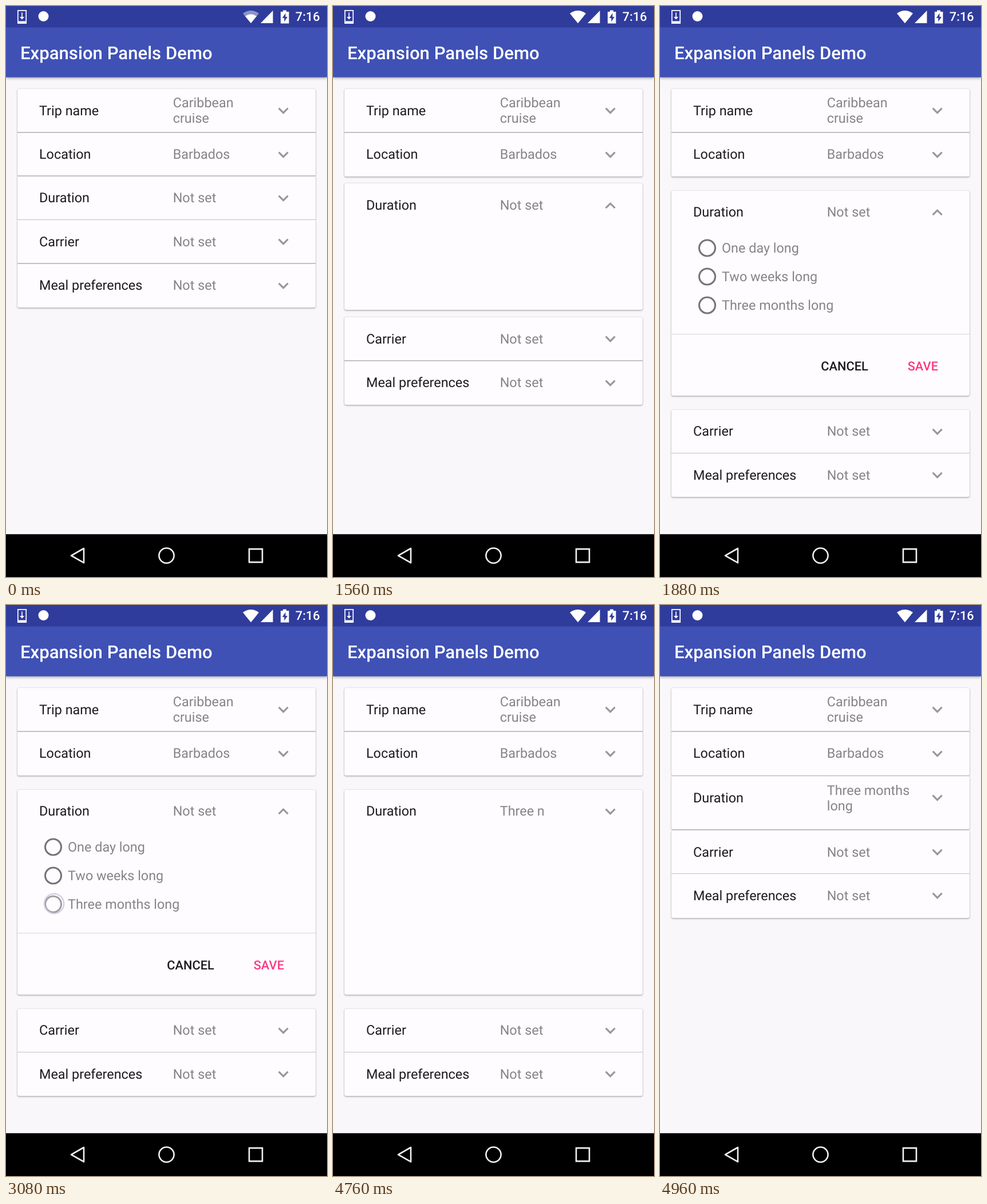
An HTML page for the animation above (5000 ms loop, 561 by 998 pixels).

```html
<!DOCTYPE html>
<html lang="en">
<head>
<meta charset="utf-8">
<title>Expansion Panels Demo</title>
<style>
  html, body { margin: 0; width: 100%; height: 100%; overflow: hidden; }
  body { position: relative; background: #f9f7fa; font: 23.4px/27.4px Roboto, sans-serif; color: #1c1b1e;
    text-rendering: geometricPrecision; }
  body > *, .row > *, .body > * { position: absolute; }
  .bar { filter: drop-shadow(0 2px 2px rgba(0,0,0,.3)); }
  .title { left: 25px; top: 64px; font-size: 31.1px; line-height: 37px; font-weight: 500; color: #fff; white-space: nowrap; }
  .clock { left: 505.8px; top: 7px; font-size: 21.8px; line-height: 26px; font-weight: 500; color: #fff; }
  .card { left: 20px; width: 521px; background: #fefcff; border-radius: 3px;
    box-shadow: 0 1.5px 3px rgba(0,0,0,.28), 0 0 2px rgba(0,0,0,.2); }
  .row { position: relative; height: 76.4px; }
  .row + .row::before, .merged .card + .card .row:first-child::before {
    content: ""; position: absolute; left: 0; top: -1.4px; width: 100%; height: 1.7px; background: #c2c0c4; }
  .merged .card + .card { border-radius: 0 0 3px 3px; }
  .name { left: 38px; top: 24.8px; white-space: nowrap; }
  .hint { left: 271.7px; top: .6px; bottom: 0; margin: auto 0; height: fit-content;
    overflow: hidden; white-space: nowrap; color: #858487; }
  .chevron { left: 450px; top: 23.3px; fill: none; stroke: #98979a; stroke-width: 3.1; }
  .body { position: relative; overflow: hidden; }
  .body > div { inset: 0 0 auto; height: 281.7px; }
  .body span { position: absolute; white-space: nowrap; }
  .label { left: 88px; color: #858487; }
  .button { top: 218px; font-size: 21.8px; font-weight: 500; }
  .touch { box-sizing: border-box; width: 36px; height: 36px; margin: -18px; border-radius: 50%;
    border: 2px solid #cfcbe2; background: rgba(255,255,255,.3); box-shadow: 0 0 2px #dcd8ec; }
  svg { display: block; overflow: visible; }
</style>
</head>
<body>
<svg style="left:0;top:0" width="561" height="998" fill="#fff">
  <rect class="bar" y="30" width="561" height="94.6" fill="#3f51b5"/>
  <rect width="561" height="37.4" fill="#303c9c"/>
  <rect y="923.2" width="561" height="74.8" fill="#000"/>
  <path d="M20.8 7.8H35.2V30H20.8Z" fill="none" stroke="#fff" stroke-width="1.7"/>
  <path d="M20 26.5H36V31H20ZM27.2 11.5H28.8V19H32L28 23.5L24 19H27.2Z"/>
  <circle cx="65.5" cy="18" r="9"/>
  <path id="wifi" d="M414 13Q428 3 442 13L428 30Z"/>
  <path d="M414 13Q428 3 442 13L428 30Z" transform="translate(428 30) scale(.72) translate(-428 -30)"/>
  <path d="M445 30L466.5 30V8Z"/>
  <path d="M480 10H484V7.5H490V10H494.5V30.5H480Z"/>
  <path d="M488.5 12.5L482.8 21H486.3V27.5L492 19H488.5Z" fill="#303c9c"/>
  <g fill="none" stroke="#f2f2f2" stroke-width="2.6">
    <path d="M114 960.6L136 948V973.2Z" stroke-linejoin="round"/>
    <circle cx="280.5" cy="960.6" r="13.1"/>
    <path d="M425 949.1H448V972.1H425Z"/>
  </g>
</svg>
<div class="title">Expansion Panels Demo</div>
<div class="clock">7:16</div>

<div class="card"></div>
<div class="card"></div>
<div class="card"></div>
<div class="touch" id="touch"></div>

<script>
const LOOP = 5000, STEP = 40, ROW = 76.4, TOP = 144.9, GAP = 24.9, BODY = 281.7;
const PINK = '#fb3a80', GREY = '#757477';
const wifi = document.getElementById('wifi'), touch = document.getElementById('touch');
const cards = [...document.querySelectorAll('.card')];

const row = (name, hint) => `<div class="row"><div class="name">${name}</div><div class="hint">${hint}</div>
  <svg class="chevron" width="30" height="30"><path d="M6.7 10.7l8 8 8-8"/></svg></div>`;

const radio = (label, i) => {
  const y = 24 + 50 * i;
  return `<svg style="position:absolute;left:62px;top:${y}px" width="1" height="1">
    <circle class="ring" cx=".5" r="14" fill="none" stroke="${GREY}" stroke-width="3.1"/>
    <circle class="dot" cx=".5" r="0" fill="${PINK}"/></svg>
    <span class="label" style="top:${y - 13}px">${label}</span>`;
};

cards[0].innerHTML = row('Trip name', 'Caribbean<br>cruise') + row('Location', 'Barbados');
cards[1].innerHTML = row('Duration', 'Not set') + `<div class="body"><div>
  ${['One day long', 'Two weeks long', 'Three months long'].map(radio).join('')}
  <span style="left:0;top:173.7px;width:100%;height:1.6px;background:#d6d4d8"></span>
  <span class="button" style="left:261.2px">CANCEL</span>
  <span class="button" style="left:412.7px;color:${PINK}">SAVE</span></div></div>`;
cards[2].innerHTML = row('Carrier', 'Not set') + row('Meal preferences', 'Not set');

const body = cards[1].querySelector('.body'), content = body.firstElementChild;
const hint = cards[1].querySelector('.hint'), chevron = cards[1].querySelector('.chevron path');
const ring = cards[1].querySelectorAll('.ring')[2], dot = cards[1].querySelectorAll('.dot')[2];

const progress = (t, start, length) => Math.min(1, Math.max(0, (t - start) / length));
const mix = (a, b, k) => a + (b - a) * k;

// cubic-bezier(.4, 0, .2, 1)
function ease(x) {
  let lo = 0, hi = 1;
  for (let i = 0; i < 20; i++) {
    const s = (lo + hi) / 2, r = 1 - s;
    if (1.2 * r * r * s + .6 * r * s * s + s ** 3 < x) lo = s; else hi = s;
  }
  return lo < 1e-4 ? 0 : lo > 1 - 1e-4 ? 1 : lo * lo * (3 - 2 * lo);
}

const taps = [
  { from: 1280, to: 1400, x: 421, y: 323.5 },
  { from: 3080, to: 3240, x: 84, y: 522 },
  { from: 4360, to: 4480, x: 460, y: 628 }
];

function draw(t) {
  const saved = t >= 4760;
  const grow = progress(t, 1418, 400), shrink = ease(progress(t, 4771, 268));
  const open = ease(grow) * (1 - shrink);

  const top = TOP + 2 * ROW + GAP * open;
  cards[0].style.top = TOP + 'px';
  cards[1].style.top = top + 'px';
  cards[2].style.top = top + ROW + (BODY + GAP) * open + 'px';
  document.body.classList.toggle('merged', open === 0);
  body.style.height = BODY * open + 'px';
  content.style.opacity = saved ? 0 : ease(progress(grow, .4, .6));
  chevron.setAttribute('transform', grow > 0 && !saved ? 'matrix(1 0 0 -1 0 29.8)' : '');

  const text = saved ? 'Three months<br>long' : 'Not set';
  if (hint.innerHTML !== text) hint.innerHTML = text;
  hint.style.width = saved ? mix(76, 152, shrink) + 'px' : '';
  hint.style.height = saved ? mix(27.4, 54.8, shrink) + 'px' : '';

  const picked = progress(t, 3480, 340);
  ring.style.stroke = `color-mix(in srgb, ${PINK} ${picked * 100}%, ${GREY})`;
  dot.setAttribute('r', 7.8 * picked);

  wifi.setAttribute('opacity', t < 160 ? .45 : 1);
  const tap = taps.find(p => t >= p.from && t < p.to);
  touch.style.display = tap ? '' : 'none';
  if (tap) Object.assign(touch.style, { left: tap.x + 'px', top: tap.y + 'px' });
}

// The screen advances at 25 pictures per second.
function tick() {
  draw(Math.floor((performance.now() % LOOP) / STEP) * STEP);
  requestAnimationFrame(tick);
}
tick();
</script>
</body>
</html>
```
